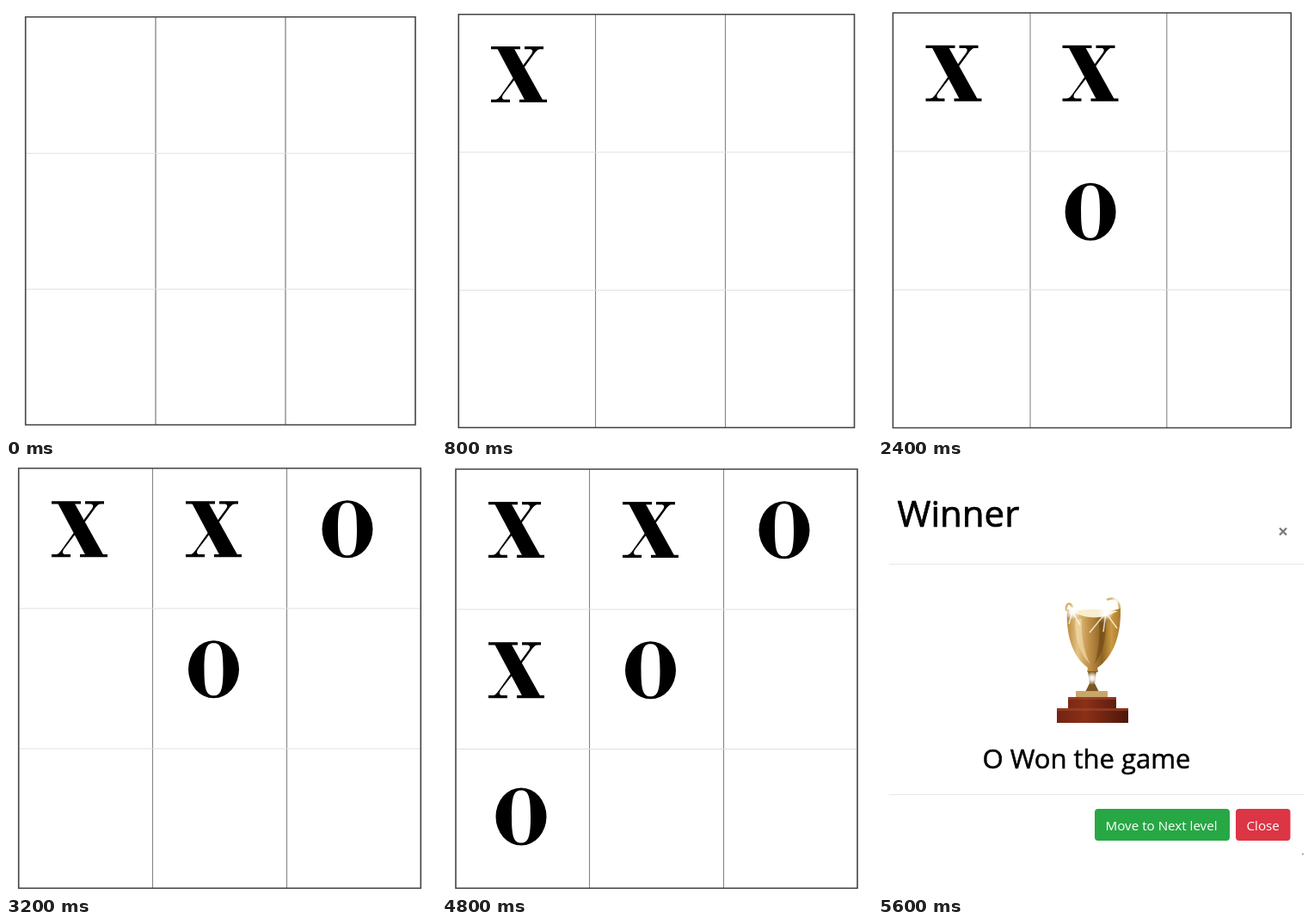
An HTML page that plays this animation: 500 by 500 pixels, repeating every 6400 ms.

```html
<!DOCTYPE html>
<html lang="en">
<head>
<meta charset="utf-8">
<title>Noughts and crosses</title>
<style>
html, body { margin: 0; width: 100%; height: 100%; overflow: hidden; background: #fff; }
svg { display: block; width: 100%; height: 100%; }
text { font-family: "Open Sans", "Noto Sans", sans-serif; }
.btn { font-size: 15.2px; fill: #fff; }
</style>
</head>
<body>
<svg viewBox="0 0 500 500">
  <defs>
    <g id="X">
      <path d="M7 2H26.5L60.5 63H39.5Z"/>
      <path d="M0 0H34V3.2H0ZM39 0H61V3.2H39ZM0 61.8H22V65H0ZM33 61.8H65V65H33Z"/>
      <path d="M45 2.5C49.5 4 48.5 7 46.5 9.5L34 26.5L36 28L49.5 9.5C52 6 54 3 59 2.5Z"/>
      <path d="M27 35L12.5 55.5C10 59 8 62 3 62.5H16.5C12 61 12.5 58.500 14.500 55.500L29 36.500Z"/>
    </g>
    <path id="O" fill-rule="evenodd" d="M0 33.500A29.500 33.500 0 0 1 59 33.500A29.500 33.500 0 0 1 0 33.500Z
      M18.500 33.500C18.500 10 21 3 29.500 3S40.500 10 40.500 33.500S38 64 29.500 64S18.500 57 18.500 33.500Z"/>
    <linearGradient id="gold">
      <stop offset="0" stop-color="#b98a3c"/><stop offset=".2" stop-color="#e3c283"/>
      <stop offset=".4" stop-color="#c2934a"/><stop offset=".65" stop-color="#8f6222"/>
      <stop offset=".83" stop-color="#c99a42"/><stop offset="1" stop-color="#a8782c"/>
    </linearGradient>
    <linearGradient id="wood">
      <stop offset="0" stop-color="#712412"/><stop offset=".4" stop-color="#8a3018"/>
      <stop offset="1" stop-color="#4e160a"/>
    </linearGradient>
    <radialGradient id="glow">
      <stop offset="0" stop-color="#fff"/><stop offset=".35" stop-color="#fff" stop-opacity=".85"/>
      <stop offset="1" stop-color="#fff" stop-opacity="0"/>
    </radialGradient>
  </defs>
  <g id="board">
    <path id="cols" fill="none"/>
    <path id="rows" fill="none" stroke="#e0e0e0"/>
    <path id="edge" fill="none" stroke="#444" stroke-width="1.6"/>
    <g id="marks"></g>
  </g>
  <g id="win" display="none">
    <text x="22.500" y="73" font-size="42" stroke="#000" stroke-width=".7">Winner</text>
    <path d="M467 74.500L475 82.500M475 74.500L467 82.500" stroke="#777" stroke-width="2.200"/>
    <path d="M13 116.500H495M13 384.500H495" stroke="#e6e8ea"/>
    <g id="cup">
      <path d="M219 171C218 161 224 160 226 167M266 158C273 154 281 158 281 169" fill="none" stroke="#d8b170" stroke-width="2.500"/>
      <path d="M220 169Q251 177 282 168C283 205 270 227 255 237L256 242H243L244 237C229 226 218 204 220 169Z" fill="url(#gold)"/>
      <path d="M225 171Q251 167 279 171Q251 186 225 171Z" fill="#f8edcf"/>
      <path d="M237 180C236 204 241 222 247 233C234 221 229 202 229 181Z" fill="#f1dcac" opacity=".65"/>
      <path d="M265 184C266 205 260 222 252 232C257 215 258 199 257 183Z" fill="#5f3d12" opacity=".45"/>
      <path d="M244 241H254L252 255L257 265H241L246 255Z" fill="#7c5720"/>
      <circle cx="249" cy="249" r="8" fill="url(#glow)"/>
      <circle cx="226" cy="172" r="9" fill="url(#glow)"/>
      <circle cx="265" cy="173" r="9" fill="url(#glow)"/>
      <circle cx="276" cy="160" r="6" fill="url(#glow)"/>
      <path d="M265 173L246 196M265 173L278 191M226 172L235 187M226 172L222 186M265 173L262 195" stroke="#fff" stroke-width="1.500" opacity=".75"/>
      <path d="M230 264H267V272H230Z" fill="#c9a66a"/>
      <path d="M221 271H277V284H221ZM208 284H291V301H208Z" fill="url(#wood)"/>
      <path d="M221 271H277V274H221ZM208 284H291V287H208Z" fill="#a4472a" opacity=".6"/>
    </g>
    <text x="121.500" y="353.500" font-size="31" stroke="#000" stroke-width=".5">O Won the game</text>
    <rect x="252" y="401" width="157" height="37" rx="4" fill="#28a745"/>
    <rect x="416" y="401" width="63.500" height="37" rx="4" fill="#dc3545"/>
    <text class="btn" x="264.500" y="426">Move to Next level</text>
    <text class="btn" x="428.500" y="426">Close</text>
    <path d="M493 453.500H495" stroke="#777"/>
  </g>
</svg>
<script>
const STEP = 800, LOOP = 8 * STEP;
const $ = id => document.getElementById(id);

// Column edges, row edges, then marks as [shape, left, top]
const last = {
  xs: [16, 171.5, 327.5, 483], ys: [6, 169, 331.5, 493.3],
  marks: [["X", 54, 44], ["X", 210, 44], ["O", 368.5, 43.2], ["O", 213, 206.2], ["X", 54, 207.3]]
};
const boards = [
  { xs: [22.7, 174, 325, 476], ys: [12.7, 171.3, 329.3, 487], marks: [], col: "#a2a2a2", wide: 1.7 },
  { xs: [19.3, 178.5, 329.5, 479.5], ys: [9.8, 170, 330.4, 490.2], marks: [["X", 57, 47]] },
  { xs: [19.3, 178.5, 336.5, 479.5], ys: [9.8, 170, 330.4, 490.2], marks: [["X", 57, 47], ["O", 219, 207]] },
  { xs: [17.4, 177, 335.8, 480.3], ys: [8, 169, 330, 490.5],
    marks: [["X", 55.5, 45.7], ["X", 214.5, 45.7], ["O", 217.6, 205.7]] },
  { xs: [14.7, 170.5, 326.5, 482.3], ys: [5, 168, 331, 493.3],
    marks: [["X", 53, 43.2], ["X", 209, 43.2], ["O", 367.5, 42.3], ["O", 212, 205.3]] },
  last,
  { ...last, marks: [...last.marks, ["O", 62.5, 376.5]] }
];

let shown = -1;

function draw(time) {
  const n = Math.floor(time % LOOP / STEP);
  if (n === shown) return;
  shown = n;
  const b = boards[n];
  $("board").setAttribute("display", b ? "inline" : "none");
  $("win").setAttribute("display", b ? "none" : "inline");
  if (!b) return;
  const [x0, x1, x2, x3] = b.xs, [y0, y1, y2, y3] = b.ys;
  $("cols").setAttribute("d", `M${x1} ${y0}V${y3}M${x2} ${y0}V${y3}`);
  $("cols").setAttribute("stroke", b.col || "#858585");
  $("cols").setAttribute("stroke-width", b.wide || 1.1);
  $("rows").setAttribute("d", `M${x0} ${y1}H${x3}M${x0} ${y2}H${x3}`);
  $("edge").setAttribute("d", `M${x0} ${y0}H${x3}V${y3}H${x0}Z`);
  $("marks").innerHTML = b.marks.map(([s, x, y]) => `<use href="#${s}" x="${x}" y="${y}"/>`).join("");
}

const start = performance.now();
function tick() {
  draw(performance.now() - start);
  requestAnimationFrame(tick);
}
tick();
</script>
</body>
</html>
```
